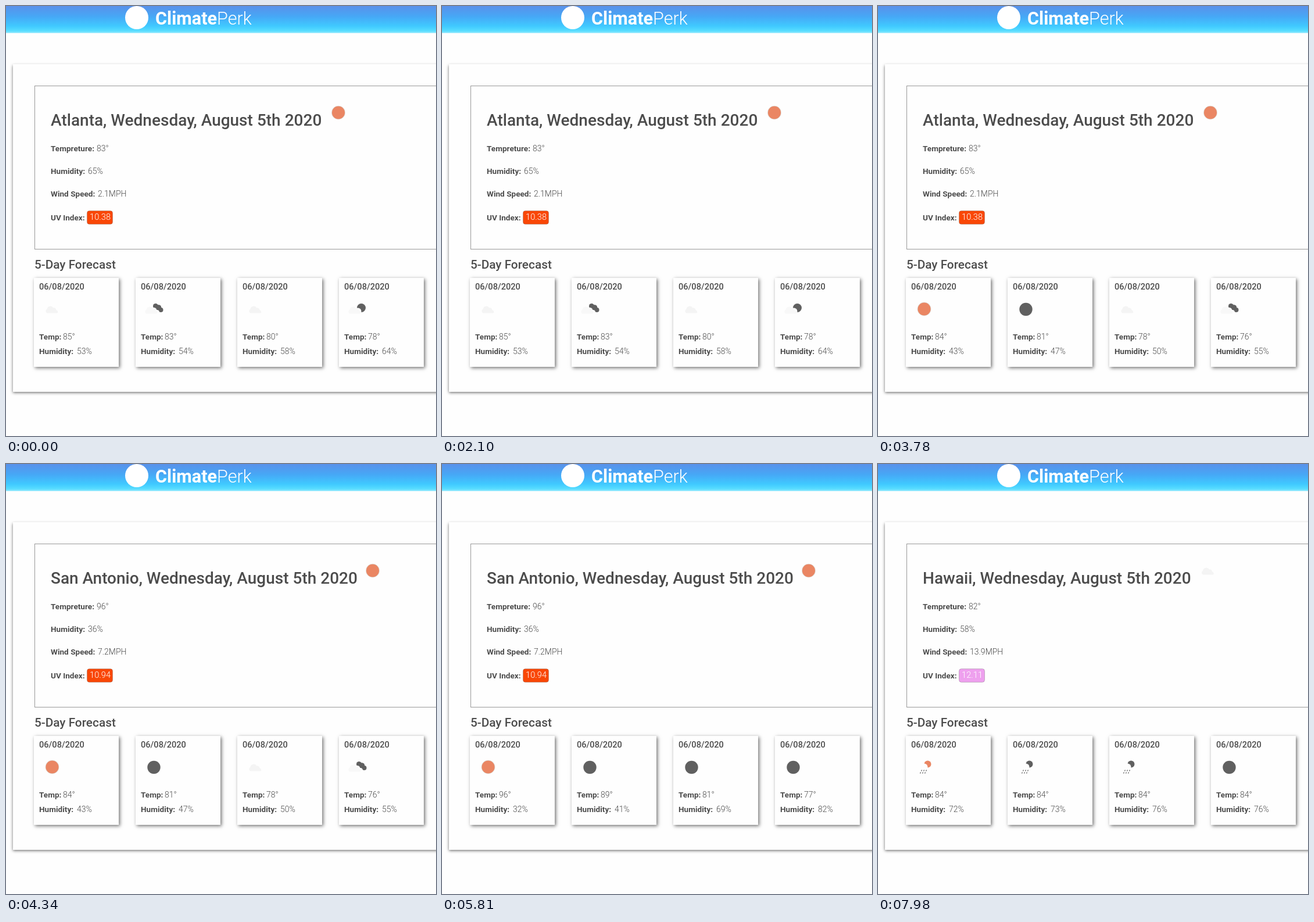
Recreate the animation shown at these times as an HTML page. Size 740 by 740 pixels, loop 8 s.

```html
<!DOCTYPE html>
<html lang="en">
<head>
<meta charset="utf-8">
<title>Weather dashboard</title>
<style>
  html, body { margin: 0; width: 100%; height: 100%; overflow: hidden; background: #fefefe; }
  #stage { position: absolute; inset: 0; overflow: clip; contain: strict; }
  #stage > * { position: absolute; box-sizing: border-box; }
  header { left: 0; top: 0; width: 100%; height: 46px; box-shadow: 0 1px #c4f2fd;
    background: linear-gradient(#5991ea, #46a8f6 40%, #40c9ff 75%, #55dcff 92%, #84e6ff); }
  .panel { left: 12px; top: 100px; width: 800px; height: 564px; background: #fefefe; box-shadow: 0 1.5px 5px #6c6c6c; }
  .today { left: 49px; top: 137px; width: 760px; height: 282px; border: 1px solid #999; }
  .card { top: 468px; width: 146px; height: 153px; background: #fefefe; box-shadow: 1.5px 2px 6px #707070; }
  svg { left: 0; top: 0; font: 300 14px Roboto, sans-serif; fill: #4c4c4c; }
  .label { font-weight: 600; font-size: 13.6px; }
  .date { font-weight: 500; font-size: 14.6px; }
  .title { font-weight: 500; font-size: 28px; }
  .section { font-weight: 500; font-size: 20.8px; }
  .uv { font-size: 14.7px; fill: #fff; }
  .brand { font-size: 30.6px; fill: #fff; }
  .brand tspan { font-weight: 700; }
</style>
</head>
<body>
<div id="stage">
  <header></header>
  <div class="panel"></div>
  <div class="today"></div>
  <svg id="view" width="740" height="740"></svg>
</div>
<script>
const LOOP = 8000;
const CARD_X = [48, 223, 398, 573];
const PAPER = '#fefefe', ORANGE = '#ea8663', DARK = '#606060', RED = '#f94706', PINK = '#eea0ee';

// Current conditions; each entry holds until the next start time.
const cities = [
  { at: 0, city: 'Atlanta', icon: 'sun', iconX: 572, temp: 83, humidity: 65, wind: 2.1, uv: '10.38', badge: RED },
  { at: 4270, city: 'San Antonio', icon: 'sun', iconX: 631, temp: 96, humidity: 36, wind: 7.2, uv: '10.94', badge: RED },
  { at: 6580, city: 'Miami', icon: 'cloud', iconX: 562, temp: 84, humidity: 74, wind: 4.1, uv: '12.11', badge: PINK },
  { at: 7840, city: 'Hawaii', icon: 'cloud', iconX: 568, temp: 82, humidity: 58, wind: 13.9, uv: '12.11', badge: PINK }
];

// The forecast loads separately: [icon, temperature, humidity] per card.
const forecasts = [
  { at: 0, days: [['cloud', 85, 53], ['broken', 83, 54], ['cloud', 80, 58], ['few', 78, 64]] },
  { at: 3710, days: [['sun', 84, 43], ['moon', 81, 47], ['cloud', 78, 50], ['broken', 76, 55]] },
  { at: 4760, days: [['sun', 96, 32], ['moon', 89, 41], ['moon', 81, 69], ['moon', 77, 82]] },
  { at: 7070, days: [['rainDay', 84, 72], ['rainNight', 84, 73], ['rainNight', 84, 76], ['moon', 84, 76]] }
];

const circle = (x, y, r, fill) => `<circle cx="${x}" cy="${y}" r="${r}" fill="${fill}"/>`;
const text = (x, y, content, cls = '') => `<text x="${x}" y="${y}" class="${cls}">${content}</text>`;
const field = (x, y, label, valueX, value) => text(x, y, label + ':', 'label') + text(valueX, y, value);

const cloud = fill =>
  `<path fill="${fill}" d="M-9 7a4 4 0 0 1 0-7 6 6 0 0 1 11-2 4 4 0 0 1 5 4 3 3 0 0 1 2 5z"/>`;
const frontCloud = `<g transform="translate(-4 1)">${cloud('#f8f8f8')}</g>`;

const rain = color => circle(6, -5, 6, color) + circle(0, 0, 6, PAPER) +
  `<path d="M-4 5l-1 2M0 5l-1 2M4 5l-1 2M-6 9l-1 2M-2 9l-1 2M2 9l-1 2" stroke="#666" stroke-width="1.4"/>`;

const icons = {
  sun: circle(0, 0, 11.8, '#dcd5cf') + circle(0, 0, 11, ORANGE),
  moon: circle(0, .5, 11.2, DARK),
  cloud: cloud('#f4f4f4'),
  broken: circle(3, -5, 4.5, DARK) + circle(8, -2.5, 4.8, DARK) + circle(12, 1.5, 4, DARK) +
    circle(0, 2, 4.5, PAPER) + circle(5, 6, 4.5, PAPER) + frontCloud,
  few: circle(7, -2, 7.5, DARK) + circle(1, 4, 6, PAPER) + frontCloud,
  rainDay: rain(ORANGE),
  rainNight: rain(DARK)
};
const icon = (name, x, y) => `<g transform="translate(${x} ${y})">${icons[name]}</g>`;

function today(c) {
  return text(77, 206, `${c.city}, Wednesday, August 5th 2020`, 'title') +
    icon(c.icon, c.iconX, 183.5) +
    field(77, 250, 'Tempreture', 156, c.temp + '°') +
    field(77, 289, 'Humidity', 141, c.humidity + '%') +
    field(77, 328, 'Wind Speed', 158, c.wind + 'MPH') +
    text(77, 369, 'UV Index:', 'label') +
    `<rect x="139.5" y="352.5" width="44" height="23" rx="4" fill="${c.badge}" stroke="#555" stroke-opacity=".3"/>` +
    text(144, 368, c.uv, 'uv');
}

function day([name, temp, humidity], i) {
  const x = CARD_X[i];
  return text(x + 9, 488, '06/08/2020', 'date') +
    icon(name, x + 31.5, 521.5) +
    field(x + 9, 574, 'Temp', x + 50, temp + '°') +
    field(x + 9, 599, 'Humidity', x + 74, humidity + '%');
}

const view = document.getElementById('view');
CARD_X.forEach(x => {
  const card = document.createElement('div');
  card.className = 'card';
  card.style.left = x + 'px';
  view.before(card);
});

const fixed = circle(225, 20, 20, '#fff') +
  text(257, 32, '<tspan>Climate</tspan>Perk', 'brand') +
  text(49, 452, '5-Day Forecast', 'section');

const currentAt = (list, time) => list.findLast(entry => entry.at <= time);
let shownCity, shownForecast;

function render() {
  const time = performance.now() % LOOP;
  const city = currentAt(cities, time), forecast = currentAt(forecasts, time);
  if (city !== shownCity || forecast !== shownForecast) {
    view.innerHTML = fixed + today(city) + forecast.days.map(day).join('');
    shownCity = city;
    shownForecast = forecast;
  }
  requestAnimationFrame(render);
}
render();
</script>
</body>
</html>
```
